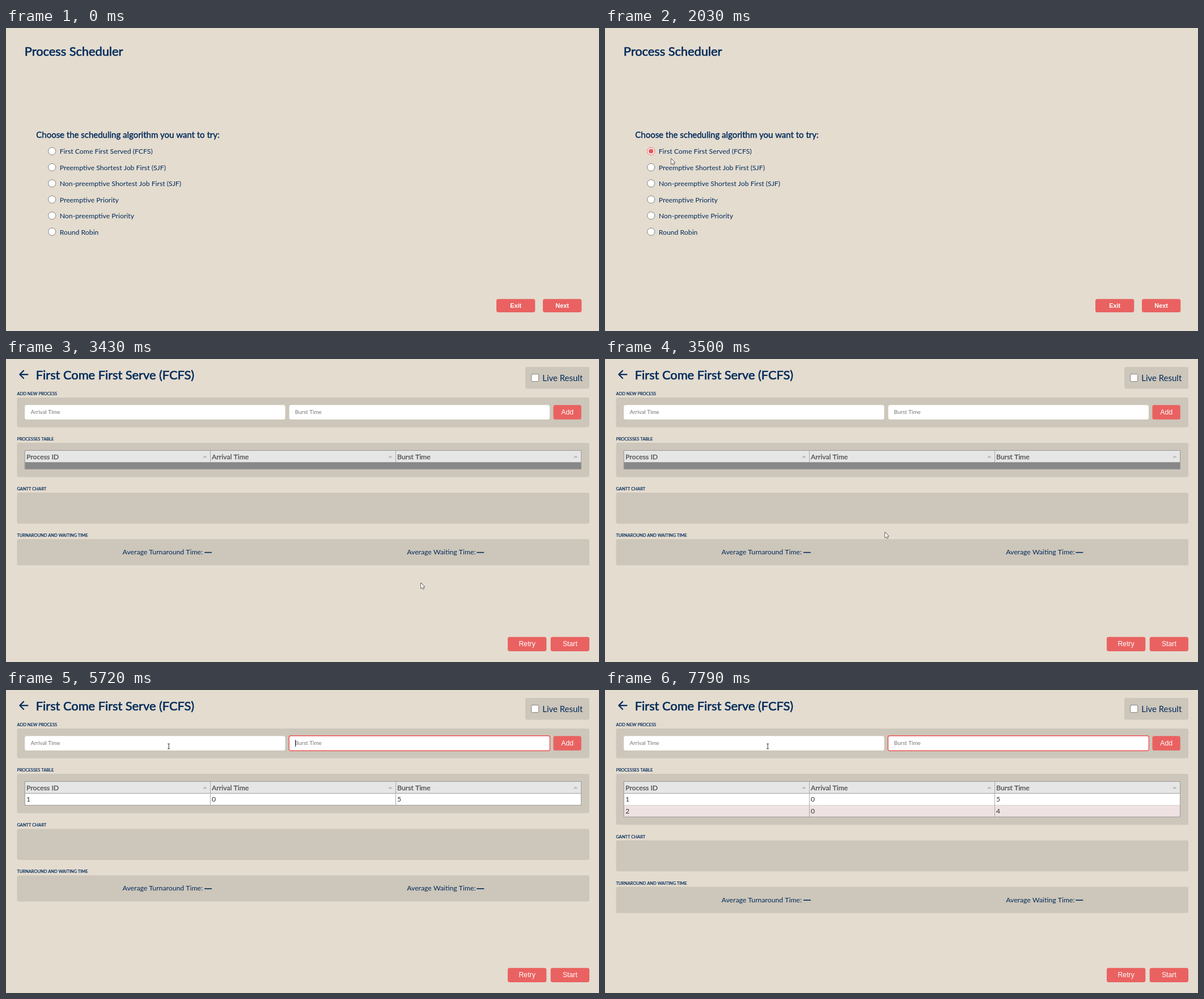
An HTML page with a canvas for the animation above (8000 ms loop, 1046 px wide and 535 px high).

```html
<!DOCTYPE html>
<html lang="en">
<head>
<meta charset="utf-8">
<title>Process Scheduler</title>
<style>
html, body { margin: 0; width: 100%; height: 100%; overflow: hidden; background: #e4dccf; }
canvas { display: block; width: 1046px; height: 535px; }
</style>
</head>
<body>
<canvas id="stage" width="1046" height="535"></canvas>
<script>
const ctx = document.getElementById('stage').getContext('2d');
const LOOP = 8000, PAGE_SWITCH = 3430, STEP = 70, BLINK = 530;
const HOVER = 1600, CHECK = 1820, KEY_GAP = 100;
const BG = '#e4dccf', NAVY = '#002b5b', RED = '#ea5455', SOFT_RED = '#e96261', PANEL = '#cdc6ba';
const LATO = 'Lato, sans-serif', ARIAL = '"Liberation Sans", Arial, sans-serif';

// Type scale: page pixels at the zoom of the stage
const ZOOM = 0.681;
const TITLE = 32 * ZOOM, LARGE = 22 * ZOOM, BODY = 18 * ZOOM, SMALL = 14.4 * ZOOM, TINY = 11 * ZOOM;

const smooth = p => p * p * (3 - 2 * p);
const easeIn = p => p * p;
const easeOut = p => 1 - (1 - p) ** 2;

// Each move begins where the one before it ended
const MOVES = [
  { from: 310, to: 650, x: 151, y: 359, ease: smooth },
  { from: 910, to: 1670, x: 80, y: 216, ease: smooth },
  { from: 1750, to: 2030, x: 117, y: 231, ease: easeIn },
  { from: 2100, to: 2520, x: 917, y: 435, ease: smooth },
  { from: 2590, to: 2940, x: 970, y: 485, ease: easeOut },
  { from: 3430, to: 3500, x: 494, y: 306, ease: smooth },
  { from: 3570, to: 4260, x: 287, y: 99, ease: easeOut }
];
const ENTRANCE = { x: 935, y: 532 };

const ENTRIES = [
  { focus: 4390, type: 5320, submit: 5720, arrival: '0', burst: '5' },
  { focus: 6530, type: 7060, submit: 7590, arrival: '0', burst: '4' }
];

const OPTIONS = [
  'First Come First Served (FCFS)', 'Preemptive Shortest Job First (SJF)',
  'Non-preemptive Shortest Job First (SJF)', 'Preemptive Priority',
  'Non-preemptive Priority', 'Round Robin'
];

function pointer(t) {
  if (t < MOVES[0].from) return null;
  let { x, y } = ENTRANCE;
  for (const m of MOVES) {
    if (t < m.from) break;
    const steps = Math.round((m.to - m.from) / STEP) + 1;
    const done = Math.min(steps, Math.floor((t - m.from) / STEP) + 1);
    const f = m.ease(done / steps);
    x += (m.x - x) * f;
    y += (m.y - y) * f;
  }
  return { x, y };
}

function formState(t) {
  const form = { focus: '', arrival: '', burst: '', caret: false, jobs: [] };
  let last = 0;
  for (const e of ENTRIES) {
    const tab = e.type + KEY_GAP, second = tab + KEY_GAP;
    const open = t < e.submit;
    if (t >= e.focus) form.focus = t < tab ? 'arrival' : 'burst';
    if (t >= e.type && open) form.arrival = e.arrival;
    if (t >= second && open) form.burst = e.burst;
    if (!open) form.jobs.push([form.jobs.length + 1, e.arrival, e.burst]);
    for (const time of [e.focus, e.type, tab, second]) if (t >= time) last = time;
  }
  form.caret = Math.floor((t - last) / BLINK) % 2 === 0;
  return form;
}

function rect(x, y, w, h, fill) {
  ctx.fillStyle = fill;
  ctx.fillRect(x, y, w, h);
}

function box(x, y, r, b, fill, stroke, width = 1, radius = 3.4) {
  ctx.beginPath();
  ctx.roundRect(x, y, r - x, b - y, radius);
  ctx.fillStyle = fill;
  ctx.fill();
  if (!stroke) return;
  ctx.strokeStyle = stroke;
  ctx.lineWidth = width;
  ctx.stroke();
}

function text(str, x, y, size, color = NAVY, heavy = false) {
  ctx.font = `${size}px ${LATO}`;
  ctx.textAlign = 'left';
  ctx.fillStyle = color;
  ctx.fillText(str, x, y);
  if (!heavy) return;
  ctx.strokeStyle = color;
  ctx.lineWidth = size / 34;
  ctx.lineJoin = 'round';
  ctx.strokeText(str, x, y);
}

function button(label, x, y, r, b, font, fill = SOFT_RED) {
  box(x, y, r, b, fill);
  ctx.font = `${font} ${ARIAL}`;
  ctx.textAlign = 'center';
  ctx.fillStyle = '#fff';
  ctx.fillText(label, (x + r) / 2, (y + b) / 2 + 3.9);
}

function polygon(points, x, y) {
  ctx.beginPath();
  points.forEach(([px, py]) => ctx.lineTo(x + px, y + py));
  ctx.closePath();
}

function outlined() {
  ctx.lineJoin = 'round';
  ctx.strokeStyle = '#222';
  ctx.lineWidth = 1.2;
  ctx.stroke();
  ctx.fillStyle = '#fff';
  ctx.fill();
}

function arrow(x, y) {
  polygon([[0, 0], [0, 9.4], [2.1, 7.5], [3.5, 10.7], [5, 10], [3.6, 7], [6.3, 6.8]], x, y);
  outlined();
}

function hand(x, y) {
  ctx.beginPath();
  ctx.roundRect(x - 1.2, y, 2, 8, 1);
  ctx.roundRect(x - 2.6, y + 4.4, 7.6, 7.2, 2.4);
  outlined();
}

function iBeam(x, y) {
  rect(x - 0.4, y - 4, 1, 9, '#333');
  rect(x - 2, y - 4.4, 4, 0.9, '#333');
  rect(x - 2, y + 4.4, 4, 0.9, '#333');
}

function disc(x, y, r, fill) {
  ctx.beginPath();
  ctx.arc(x, y, r, 0, 7);
  ctx.fillStyle = fill;
  ctx.fill();
}

function radio(y, on, hover) {
  disc(81.2, y, 6.6, '#fff');
  ctx.lineWidth = 0.9;
  ctx.strokeStyle = on ? RED : hover ? '#4f4f4f' : '#767676';
  ctx.stroke();
  if (on) disc(81.2, y, 4.1, RED);
}

function choicePage(t, p) {
  text('Process Scheduler', 32.8, 49, TITLE, NAVY, true);
  text('Choose the scheduling algorithm you want to try:', 53.3, 193.6, LARGE, NAVY, true);
  OPTIONS.forEach((name, i) => {
    const y = 217.5 + i * 28.44;
    radio(y, i === 0 && t >= CHECK, i === 0 && t >= HOVER);
    text(name, 94.7, y + 4.9, BODY);
  });
  const hover = p && p.x > 947 && p.y > 478;
  const font = `bold ${16 * ZOOM}px`;
  button('Exit', 865, 478.5, 933.3, 502, font);
  button('Next', 947, 478.5, 1015.3, 502, font, hover ? RED : SOFT_RED);
  if (p) (hover ? hand : arrow)(p.x, p.y);
}

function field(x, r, hint, value, focused, caret) {
  if (focused) box(x - 0.4, 80.7, r + 0.4, 107.3, '#fff', RED, 1.4);
  else box(x, 81.2, r, 106.8, '#fff');
  const left = x + 10.2;
  text(value || hint, left, 97.4, SMALL, value ? '#111' : '#757575');
  const typed = ctx.measureText(value).width;
  if (focused && caret) rect(Math.round(left + typed), 88, 1, 12, '#222');
}

function section(label, top, bottom) {
  text(label, 19.4, top - 3.8, TINY, NAVY, true);
  box(19.5, top, 1029, bottom, PANEL);
}

function table(jobs) {
  const left = 33.5, column = 327, top = 182.7, row = 20.7;
  const bottom = jobs.length ? top + jobs.length * row : 194.5;
  rect(left, 161.5, 3 * column, bottom - 161.5, '#888');
  rect(left, 162, 3 * column, 20.3, '#e6e6e6');
  jobs.forEach((job, i) => rect(left, top + i * row, 3 * column, row, i % 2 ? '#eee2e2' : '#fff'));
  ['Process ID', 'Arrival Time', 'Burst Time'].forEach((name, c) => {
    const x = left + c * column;
    text(name, x + 2.6, 176.9, BODY, '#555', true);
    polygon([[-4, 4], [0, 0], [4, 4]], x + 317.3, 170.2);
    ctx.fillStyle = '#bbb';
    ctx.fill();
    jobs.forEach((job, i) => text(job[c], x + 2.6, 196.9 + i * row, BODY, '#333'));
    if (c) rect(x - 0.5, 162, 1, (jobs.length ? bottom : top) - 162, '#aaa');
  });
  rect(left, 182, 3 * column, 0.8, '#999');
  ctx.strokeStyle = '#999';
  ctx.lineWidth = 1;
  ctx.strokeRect(left, 161.5, 3 * column, bottom - 161.5);
}

function backArrow() {
  ctx.beginPath();
  ctx.moveTo(38.5, 27.3);
  ctx.lineTo(24.5, 27.3);
  ctx.moveTo(31, 20.6);
  ctx.lineTo(24.3, 27.3);
  ctx.lineTo(31, 34);
  ctx.strokeStyle = NAVY;
  ctx.lineWidth = 2.2;
  ctx.lineCap = 'round';
  ctx.lineJoin = 'round';
  ctx.stroke();
}

function average(label, x, dash, y) {
  text(label, x, y, BODY);
  rect(dash, y - 4.3, 13, 1.6, NAVY);
}

function schedulerPage(t, p) {
  const { focus, arrival, burst, caret, jobs } = formState(t);
  const shift = jobs.length ? jobs.length * 20.3 - 11.1 : 0;
  const font = `${BODY}px`;

  backArrow();
  text('First Come First Serve (FCFS)', 52.8, 35.6, TITLE, NAVY, true);
  box(916, 14, 1029, 52.5, PANEL);
  box(926.7, 26.7, 939.7, 39.7, '#fff', '#767676', 0.9, 1.8);
  text('Live Result', 946.2, 38.7, LARGE);

  section('ADD NEW PROCESS', 68, 120.5);
  field(33.2, 492.5, 'Arrival Time', arrival, focus === 'arrival', caret);
  field(499.6, 959, 'Burst Time', burst, focus === 'burst', caret);
  button('Add', 965.5, 81.2, 1014.8, 106.8, font);

  section('PROCESSES TABLE', 148, 208.4 + shift);
  table(jobs);
  section('GANTT CHART', 236 + shift, 290.7 + shift);
  section('TURNAROUND AND WAITING TIME', 318 + shift, 364.3 + shift);
  average('Average Turnaround Time:', 205.6, 350, 345.1 + shift);
  average('Average Waiting Time:', 707.2, 830.3, 345.1 + shift);

  button('Retry', 885, 490.7, 953.3, 516, font);
  button('Start', 960.7, 490.7, 1029, 516, font);

  (p.y > 81 && p.y < 107 ? iBeam : arrow)(p.x, p.y);
}

function draw(t) {
  rect(0, 0, 1046, 535, BG);
  (t < PAGE_SWITCH ? choicePage : schedulerPage)(t, pointer(t));
}

const begin = performance.now();
function tick() {
  draw((performance.now() - begin) % LOOP);
  requestAnimationFrame(tick);
}
tick();
</script>
</body>
</html>
```
